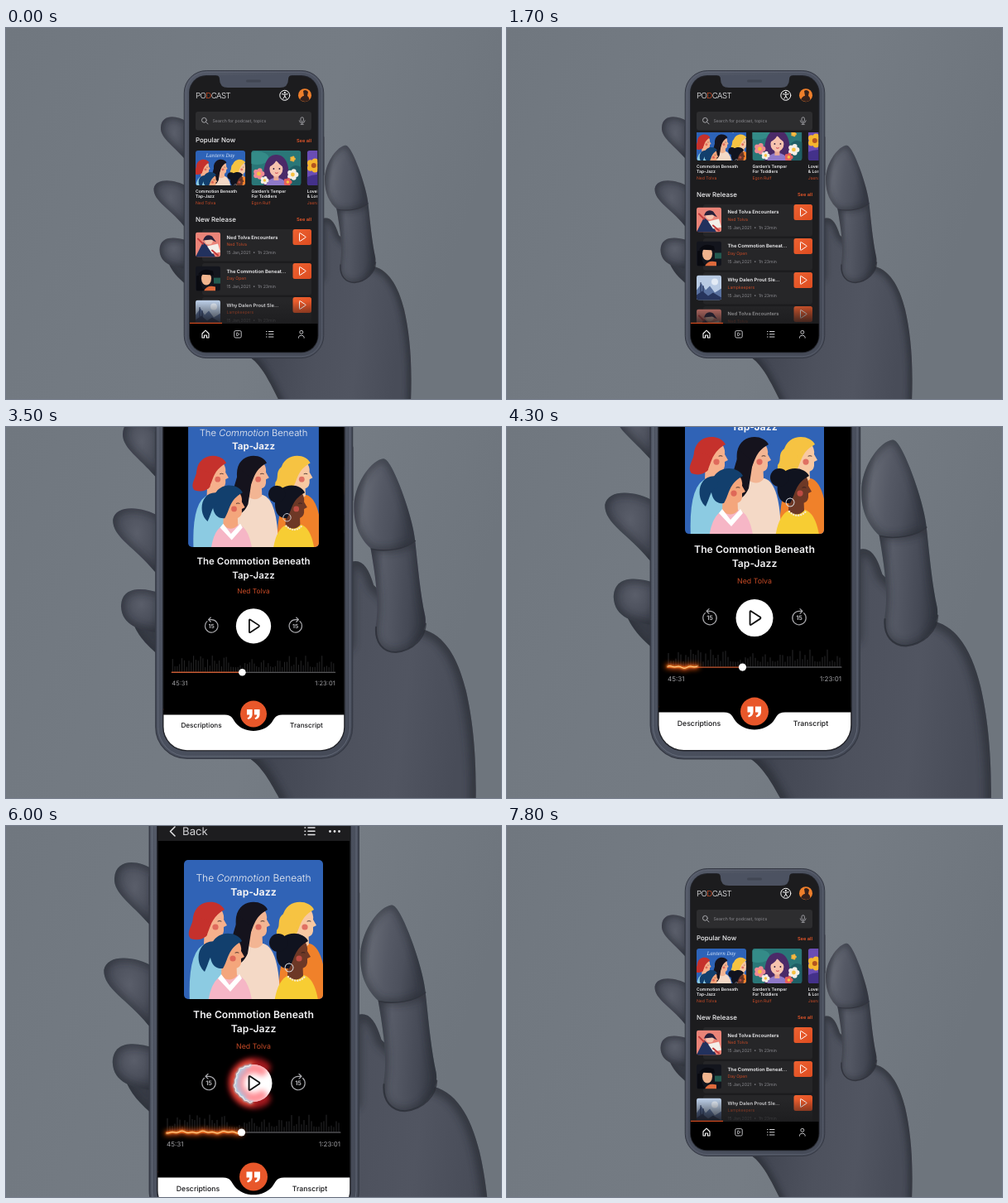
Recreate the animation shown at these times as an HTML page. Size 598 by 448 pixels, loop 8 s.

```html
<!DOCTYPE html>
<html lang="en">
<head>
<meta charset="utf-8">
<title>Podcast app</title>
<style>
html, body { margin: 0; width: 100%; height: 100%; overflow: hidden; background: #727982; }
svg { display: block; width: 598px; height: 448px; }
text { font-family: Inter, "Open Sans", sans-serif; text-rendering: geometricPrecision; fill: #f2f2f4; }
</style>
</head>
<body>
<svg id="stage" viewBox="0 0 598 448"></svg>
<script>
const LOOP = 8000, ORANGE = '#e8572a', RUST = '#c64a26';

const text = (x, y, s, size, o = '') => `<text x="${x}" y="${y}" font-size="${size}" ${o}>${s}</text>`;
const rect = (x, y, w, h, fill, r = 0, o = '') =>
  `<rect x="${x}" y="${y}" width="${w}" height="${h}" rx="${r}" fill="${fill}" ${o}/>`;
const dot = (x, y, r, fill, o = '') => `<circle cx="${x}" cy="${y}" r="${r}" fill="${fill}" ${o}/>`;
const oval = (x, y, rx, ry, fill) => `<ellipse cx="${x}" cy="${y}" rx="${rx}" ry="${ry}" fill="${fill}"/>`;
const path = (d, fill, o = '') => `<path d="${d}" fill="${fill}" ${o}/>`;
const line = (d, stroke, w = 1, o = '') =>
  `<path d="${d}" fill="none" stroke="${stroke}" stroke-width="${w}" stroke-linecap="round" stroke-linejoin="round" ${o}/>`;
const move = (x, y, inner, s = 1) => `<g transform="translate(${x} ${y}) scale(${s})">${inner}</g>`;
const clip = (id, inner) => `<g clip-path="url(#${id})">${inner}</g>`;
const clipBox = (id, x, y, w, h, r = 0) => `<clipPath id="${id}">${rect(x, y, w, h, '#fff', r)}</clipPath>`;
const stops = list => list.map((c, i) => `<stop offset="${i / (list.length - 1)}" stop-color="${c}"/>`).join('');
const radial = (id, cx, cy, r, ...c) => `<radialGradient id="${id}" cx="${cx}" cy="${cy}" r="${r}">${stops(c)}</radialGradient>`;
const linear = (id, x2, y2, ...c) => `<linearGradient id="${id}" x1="0" y1="0" x2="${x2}" y2="${y2}">${stops(c)}</linearGradient>`;
const blur = (id, d) => `<filter id="${id}" x="-60" y="-60" width="720" height="560" filterUnits="userSpaceOnUse"><feGaussianBlur stdDeviation="${d}"/></filter>`;

const defs = `<defs>
  ${linear('wall', 1, .25, '#70777f', '#737a82', '#757c84', '#6e757d')}
  ${radial('finger', .5, .35, .75, '#5a5e6a', '#4b4f5b', '#343842')}
  ${linear('thumb', 1, .2, '#3f434e', '#636772', '#555965', '#4c505c', '#3a3e49')}
  ${linear('joint', 1, .1, '#3f434e', '#585c68', '#4f535f', '#454955', '#343842')}
  ${linear('palm', 1, .15, '#343843', '#444854', '#4d515d', '#515561', '#484c58')}
  ${linear('body', 1, 1, '#535967', '#4a505e', '#454a57')}
  ${linear('play', 1, 1, '#ee6231', '#dd4c20')}
  <linearGradient id="fade" x1="0" y1="0" x2="0" y2="1"><stop offset="0" stop-color="#1c1c1e" stop-opacity="0"/><stop offset="1" stop-color="#1c1c1e" stop-opacity=".85"/></linearGradient>
  ${blur('soft', 3)}${blur('haze', 1.2)}
  ${clipBox('screen', 222, 58, 154.5, 333.3, 20)}
  ${clipBox('feed', 222, 126, 154.5, 231)}
  ${clipBox('cover', 0, 0, 60, 42, 3)}
  ${clipBox('thumbBox', 0, 0, 30, 30, 3)}
  ${clipBox('art', 215, 41, 168, 168, 5)}
  <clipPath id="disc"><circle r="22.5"/></clipPath>
</defs>`;

// A solid part of the hand with darkened rims.
let parts = 0;
function limb(d, fill, rim = 5) {
  const id = 'limb' + parts++;
  return `<clipPath id="${id}"><path d="${d}"/></clipPath>` + path(d, fill) +
    clip(id, line(d, '#272a33', rim, 'opacity=".6" filter="url(#soft)"'));
}
const hand = [
  limb('M218 113C206 105 188 104 187 120C186 132 201 141 214 156L220 162V113Z', 'url(#finger)'),
  limb('M218 191C205 183 181 180 178.5 194C178 209 198 218 214 238L220 244V192Z', 'url(#finger)'),
  limb('M195 280C199 293 208 302 220 312V276Z', '#383c46'),
  limb('M220 257C205 252 186 250 185.5 268C186 285 202 289 220 291Z', 'url(#finger)'),
  limb('M380 231C391 226 397 233 402 250L440 287C462 290 474 312 481 340C488 370 492 410 488 470L340 470L319.7 430C313 418 305 403 292 396L380 300Z', 'url(#palm)', 11),
  limb('M399 216C412 222 430 219 437.5 212C440 235 442 258 446 276C449 291 436 307 420 307.5C407 307 402 297 404 283C407 263 403 240 399 216Z', 'url(#joint)'),
  line('M404 286C403 299 410 307.5 421 307.5C436 306 446 295 446.5 283', '#292c34', 1.4, 'opacity=".7"'),
  limb('M408.5 142C398 145 385 165 385 183C385 200 391 211 400 219C412 222 430 219 437.5 212C436 195 424 160 416 147C413 142 411 141 408.5 142Z', 'url(#thumb)'),
  line('M400 219C412 222 430 219 437.5 212', '#30333c', 1),
].join('');

const phone = rect(214.4, 118, 3, 24, '#3b3f4a', 1) + rect(381.5, 131, 3, 47, '#3b3f4a', 1) +
  rect(215.2, 51.5, 168.6, 347, 'url(#body)', 27, 'stroke="#363a45"') +
  rect(217.3, 53.3, 164.4, 343.4, 'none', 25, 'stroke="#656b7a" stroke-width=".6"') +
  rect(221, 57, 156.5, 335.3, '#23252c', 21);
const notch = path('M253 57q5 0 5 5q0 10 10 10h63q10 0 10-10q0-5 5-5z', '#4c5261') + rect(290, 62.5, 18, 3, '#414653', 1.5);

// One person in profile, facing right.
function lady(x, y, skin, hair, top, extra = '') {
  return move(x, y,
    path('M-27 100Q-30 36-8 28H10Q30 34 30 100Z', top) +
    path('M-9 5H8L9 29Q0 38-10 29Z', skin) +
    path('M-8-14H10Q15-8 14-1L18 6L14 8V13Q13 20 6 20H-2Q-9 14-9 0Z', skin) +
    path('M15-13C9-26-19-27-23-4C-25 12-19 21-8 20C-1 9-3-3 15-13Z', hair) +
    dot(4, 8, 3.6, '#d9534d', 'opacity=".75"') + line('M7 1q2-1 4 0', '#2a1a1a', .8) + extra);
}
const crowd =
  lady(249, 114, '#f6b08c', '#c5312c', '#8ccbe2', path('M-22-6C-24 8-32 14-26 22Q-14 26-6 18L-4 0Z', '#c5312c')) +
  lady(357, 114, '#f8c8a2', '#f6c342', '#f0812a', path('M-18-10C-32-4-24 6-30 12C-32 26-18 26-8 24L-5 0Z', '#f6c342')) +
  lady(301, 114, '#f3b593', '#15131d', '#f4d9c6', path('M-20-6C-26 16-34 34-30 54Q-16 56-9 40L-4 8Z', '#15131d')) +
  lady(270, 152, '#f4a67c', '#123f6d', '#f6b6c6', path('M-14-12C-38-18-44 12-30 24C-24 12-24 2-16 2Z', '#123f6d') + path('M-10 27L0 40L12 27L15 32L1 48L-14 32Z', '#fff')) +
  lady(350, 152, '#6d3826', '#10131f', '#f7cd33', dot(-21, -11, 11, '#10131f') + line('M-9 30Q2 40 12 29', '#f6e7c8', 2.4, 'stroke-dasharray=".1 3"') + line('M-8 14a5 5 0 1 0 .1 0', '#d9d9de', 1));

const flower = (x, y, r, c, mid = '#f6c342') =>
  [0, 1, 2, 3, 4].map(i => dot(x + r * Math.cos(i * 1.257), y + r * Math.sin(i * 1.257), r * .75, c)).join('') + dot(x, y, r * .6, mid);

const covers = [
  rect(0, 0, 60, 42, '#2d63b8') + move(-90.5, -26.5, crowd, .405) +
    text(30, 7.5, 'Lantern Day', 6, 'text-anchor="middle" font-style="italic" style="font-family:\'Noto Serif\',serif;fill:#cfe0f7"'),
  rect(0, 0, 60, 42, '#2a7778') + oval(7, 9, 14, 8, '#348b88') + oval(54, 34, 12, 16, '#1f5f66') +
    path('M15 42C13 22 17 5 30 5S47 20 45 42Z', '#4b2a68') + path('M18 42Q20 33 30 33T43 42Z', '#8f79c9') +
    rect(27, 28, 6, 8, '#e9a894') + oval(30, 22, 8, 9.5, '#f6c3ae') + path('M21 20C23 8 37 8 39 20C34 17 32 14 30 12C28 16 25 18 21 20Z', '#4b2a68') +
    dot(27, 22, .9, '#2a1a3a') + dot(34, 22, .9, '#2a1a3a') + line('M29 27q1.5 1 3 0', '#cc3f4c', 1) +
    flower(9, 28, 4, '#f08a94') + flower(50, 29, 4, '#f3eee6') + flower(16, 36, 3, '#f3eee6') + flower(44, 38, 3, '#e85f5c') + flower(50, 10, 2, '#f3b13e'),
  rect(0, 0, 60, 42, '#6a4db4') + flower(8, 18, 5, '#f5b62f', '#b3541e') + oval(12, 38, 16, 9, '#43318a') +
    flower(32, 28, 5, '#f08a94') + flower(48, 14, 4, '#f5b62f', '#b3541e') + oval(50, 40, 12, 7, '#2c8f7e'),
];
const shelf = [
  ['Commotion Beneath', 'Tap-Jazz', 'Ned Tolva'],
  ['Garden’s Temper', 'For Toddlers', 'Egon Rulf'],
  ['Lovely Days', '&amp; Long Nights', 'Jasna Orlo'],
].map(([a, b, who], i) => move(229 + 67.4 * i, 148,
  clip('cover', covers[i]) + text(0, 51, a, 5.1, 'font-weight="600"') + text(0, 57.2, b, 5.1, 'font-weight="600"') +
  text(0, 65.3, who, 5.1, `style="fill:${RUST}"`))).join('');

const thumbs = [
  rect(0, 0, 30, 30, '#ea8478') + path('M0 30L9 12L18 20L24 30Z', '#22315d') + dot(16, 10, 5, '#f6c3ae') +
    path('M9 10Q12 1 20 5L25 12L19 9Z', '#27203a') + path('M14 17L27 14L30 24L20 26Z', '#f4efe9') + line('M3 8L9 14M20 22L27 28', '#c23a3a', 2),
  rect(0, 0, 30, 30, '#13151d') + oval(13, 15, 6, 8, '#f0b48e') + path('M3 10Q9 1 21 6L22 11Z', '#090a10') + path('M7 10Q4 25 12 30H1V12Z', '#090a10') +
    path('M10 30Q14 22 24 25V30Z', '#df6a3c') + rect(22, 14, 8, 7, '#235a50'),
  rect(0, 0, 30, 30, '#b9cbe4') + dot(22, 8, 4, '#e3ebf5') + path('M0 30V18L6 10L11 18L16 13L22 21L30 16V30Z', '#59719f') +
    path('M0 30V24L7 19L14 25L20 21L30 27V30Z', '#26345c') + line('M5 20V9M8 22V13', '#26345c', 1.2),
];
const triangle = 'M-3.2-4.4Q-3.2-5.2-2.4-4.8L4-.6Q4.7 0 4 .6L-2.4 4.8Q-3.2 5.2-3.2 4.4Z';
const episodes = [
  ['Ned Tolva Encounters', 'Ned Tolva'],
  ['The Commotion Beneat...', 'Day Open'],
  ['Why Dalen Prout Sle...', 'Lampkeepers'],
];
const rows = [0, 1, 2, 3, 4, 5].map(i => {
  const [name, who] = episodes[i % 3];
  return move(229, 243 + 41 * i,
    rect(8, 0, 132, 38.5, '#262628', 3) + move(0, 3.6, clip('thumbBox', thumbs[i % 3])) +
    text(37.5, 11.6, name, 5.85, 'font-weight="600"') + text(37.5, 19.7, who, 5.1, `style="fill:${RUST}"`) +
    text(37.5, 29.8, '15 Jan,2021 &#160;•&#160; 1h 23min', 5.2, 'style="fill:#8b8b90"') +
    rect(117.5, 0, 22.5, 19, 'url(#play)', 2.5) + move(128.7, 9.5, line(triangle, '#fff', 1)));
}).join('');

const heading = (y, s) => text(229, y, s, 7.9, 'font-weight="500"') +
  text(369, y - .5, 'See all', 5.7, `font-weight="600" text-anchor="end" style="fill:${ORANGE}"`);
const home = rect(222, 58, 155, 334, '#1c1c1e') +
  clip('feed', `<g id="scroll">${heading(138.3, 'Popular Now')}<g id="shelf">${shelf}</g>${heading(233.8, 'New Release')}${rows}</g>`) +
  rect(222, 330, 155, 27, 'url(#fade)') +
  text(229, 84.8, `PO<tspan fill="${ORANGE}">D</tspan>CAST`, 9.7, 'font-weight="300" letter-spacing="-.55"') +
  line('M342.8 81.3a6 6 0 1 0-12 0a6 6 0 1 0 12 0M333.4 79.8q3.4 1.2 6.8 0M336.8 80.6v2M334.8 85.2l2-2.8l2 2.8', '#fff', 1) + dot(336.8, 78, 1.1, '#fff') +
  dot(361, 81.2, 8, '#ef7f2b') + path('M355 86.5Q357 82 360 82L359 76Q362 73.5 365 77L364 82Q366 83 366.5 87Q361 91 355 86.5Z', '#35211c') +
  rect(229, 101, 140, 22.4, '#2d2d2f', 3) + line('M242.3 111.3a2.9 2.9 0 1 0-5.8 0a2.9 2.9 0 1 0 5.8 0M241.6 113.5l2.4 2.4', '#b4b4b8', .9) +
  text(249.5, 114, 'Search for podcast, topics', 5.2, 'style="fill:#8d8d92"') +
  rect(356, 107.8, 3.4, 5.4, 'none', 1.7, 'stroke="#a8a8ad" stroke-width=".9"') + line('M354.2 111.8q.4 3 3.5 3t3.5-3M357.7 115v1.4M356 116.4h3.4', '#a8a8ad', .8) +
  rect(222, 357, 155, 35, '#000') + rect(222, 355.8, 39, 1.2, '#d14a1e') +
  line('M237 369l4-3.8l4 3.8v5h-2.6v-3h-2.8v3H237z', '#fff', 1.1) +
  rect(275.8, 365.6, 8.4, 8.4, 'none', 1.5, 'stroke="#d5d5d8" stroke-width=".9"') + move(280, 369.8, line(triangle, '#d5d5d8', 2), .42) +
  line('M314.5 366.5h.6M314.5 369.8h.6M314.5 373h.6M317.4 366.5h5.6M317.4 369.8h5.6M317.4 373h5.6', '#d5d5d8', 1) +
  dot(356.8, 367.3, 2, 'none', 'stroke="#d5d5d8" stroke-width=".9"') + line('M353.5 374.2v-1q.5-2 3.3-2t3.3 2v1', '#d5d5d8', .9) +
  dot(262, 170, 14, '#fff', 'id="tap"');

// The player is laid out at the close-up scale.
const noise = i => { const v = Math.sin(i * 91.7) * 4375.5; return v - Math.floor(v); };
const ticks = Array.from({ length: 70 }, (_, i) => `M${195 + i * 3}  369v${-(5 + 15 * noise(i + 1) ** 1.5).toFixed(1)}`).join('');
const skip = (x, dir) => move(x, 310.5,
  `<g transform="scale(${dir} 1)">${line('M-5.6-6a8.2 8.2 0 1 0 5.6-2.2h-3M-1-11l-3 2.8l3 2.8', '#a9a9ad', 1.2)}</g>` +
  text(0, 2.8, '15', 7.5, 'font-weight="600" text-anchor="middle" style="fill:#c4c4c8"'));
const arc = (deg, r) => {
  const a = deg * Math.PI / 180, x = r * Math.cos(a), y = r * Math.sin(a);
  return `M${x} ${-y}A${r} ${r} 0 ${deg > 90 ? 1 : 0} 1 ${x} ${y}`;
};
const mid = 'text-anchor="middle"';
const player = rect(180, -32, 238, 505, '#000') + rect(180, -32, 238, 50, '#1d1d1f') +
  line('M204 1l-5.5 5.5L204 12', '#e4e4e6', 1.5) + text(213, 11.4, 'Back', 13.2, 'style="fill:#d2d2d5"') +
  line('M361 2h.6M361 6.3h.6M361 10.6h.6M365 2h8M365 6.3h8M365 10.6h8', '#e4e4e6', 1.5) +
  [391.5, 397, 402.5].map(x => dot(x, 6.5, 1.4, '#e4e4e6')).join('') +
  clip('art', rect(215, 41, 168, 168, '#3063b6') + crowd) +
  text(299, 66.6, 'The <tspan font-style="italic">Commotion</tspan> Beneath', 12, mid + ' font-weight="300"') +
  text(299, 84, 'Tap-Jazz', 12.2, mid + ' font-weight="700"') +
  text(299, 231.6, 'The Commotion Beneath', 12.2, mid + ' font-weight="600"') +
  text(299, 249, 'Tap-Jazz', 12.2, mid + ' font-weight="600"') +
  text(299, 268.7, 'Ned Tolva', 8.8, mid + ` style="fill:${RUST}"`) +
  skip(245, 1) + skip(353, -1) +
  move(299, 310.5,
    `<g id="halo">${line(arc(125, 23), '#e8222a', 15, 'opacity=".7" filter="url(#soft)"')}${line(arc(85, 24), '#ff6a4a', 5, 'filter="url(#soft)"')}</g>` +
    dot(0, 0, 22.5, '#fff') +
    clip('disc', `<g id="tint">${line(arc(125, 18), '#ff8f96', 12, 'filter="url(#soft)"')}${line(arc(60, 20), '#8fd0f5', 4, 'filter="url(#soft)"')}</g>`) +
    `<g id="sparks">${line('', '#8fe2ff', 2.2, 'filter="url(#haze)" id="arcGlow"')}${line('', '#ffe9e2', 1, 'id="arcCore"')}</g>` +
    move(0, 0, line(triangle, '#111', 1.1), 1.7)) +
  line(ticks, '#333335', .8) + line('M284 370H404', '#77777a', 1) + line('M194 370H284', '#c65a33', 1.4) +
  `<g id="fire">${line('', '#ff5a12', 5, 'filter="url(#soft)" class="flame"')}${line('', '#ff8a2c', 2.4, 'filter="url(#haze)" class="flame"')}${line('', '#ffe0a0', .9, 'class="flame"')}</g>` +
  dot(284.5, 370, 4.6, '#fff') +
  text(194, 386.5, '45:31', 8, 'style="fill:#a0a0a4"') + text(404, 386.5, '1:23:01', 8, 'text-anchor="end" style="fill:#a0a0a4"') +
  path('M180 424.5H262C272 424.5 272 430 276 435C287 448.8 311 448.8 322 435C326 430 326 424.5 336 424.5H418V474H180Z', '#fff') +
  dot(299, 423.5, 17, ORANGE) +
  [290.5, 300].map(x => path(`M${x} 417.5h7v6.5q0 5-5.5 6.5l-1-2q3-1 3-4h-3.5z`, '#fff')).join('') +
  text(232, 441, 'Descriptions', 8.7, mid + ' font-weight="500" style="fill:#151517"') +
  text(367, 441, 'Transcript', 8.7, mid + ' font-weight="500" style="fill:#151517"');

const stage = document.getElementById('stage');
stage.innerHTML = defs + rect(0, 0, 598, 448, 'url(#wall)') +
  `<g id="camera">${hand}${phone}${clip('screen', home + `<g id="player" transform="translate(99.667 78) scale(.66667)">${player}</g>`)}${notch}</g>`;

const $ = id => document.getElementById(id);
const set = (id, k, v) => $(id).setAttribute(k, v);
const flames = document.querySelectorAll('.flame');
const prog = (t, a, b) => Math.min(1, Math.max(0, (t - a) / (b - a)));
const inOut = p => p < .5 ? 4 * p ** 3 : 1 - 4 * (1 - p) ** 3;
const out = p => 1 - (1 - p) ** 2;

function render(t) {
  const zoom = inOut(prog(t, 2960, 3800)) - inOut(prog(t, 6000, 6700));
  const pan = inOut(prog(t, 4200, 5750));
  const s = 1 + .5 * zoom;
  set('camera', 'transform', `translate(${299 * (1 - s)} ${zoom * (80 * pan - 197)}) scale(${s})`);

  const swipe = inOut(prog(t, 340, 720)) - inOut(prog(t, 940, 1540));
  set('shelf', 'transform', `translate(${-56 * swipe} 0)`);
  const scroll = out(prog(t, 1600, 2250)) - inOut(prog(t, 2250, 2850));
  set('scroll', 'transform', `translate(0 ${-105 * scroll})`);
  const tap = prog(t, 2950, 3250);
  set('tap', 'r', 12.5 + 8 * tap);
  set('tap', 'opacity', t < 2950 ? 0 : .85 * (1 - tap));

  const shown = prog(t, 3120, 3400) - prog(t, 7450, 7700);
  set('player', 'opacity', shown);
  set('player', 'display', shown ? 'inline' : 'none');
  if (!shown) return;

  const burn = prog(t, 4100, 4600);
  let d = '';
  for (let x = 194; x <= 194 + 90 * burn; x += 2) {
    const y = 369.7 + 1.6 * Math.sin(x * .37 + t * .017) * Math.sin(x * .14 - t * .011);
    d += `${d ? 'L' : 'M'}${x} ${y.toFixed(2)}`;
  }
  flames.forEach(f => f.setAttribute('d', d));
  set('fire', 'opacity', burn && 1);

  const glow = prog(t, 4500, 4800) - prog(t, 6400, 6700);
  const turn = 70 + (t - 5200) * .1375;
  for (const id of ['halo', 'tint', 'sparks']) {
    set(id, 'opacity', glow);
    set(id, 'transform', `rotate(${turn})`);
  }
  let spark = '';
  for (let a = -1.5; a <= 1.5; a += .1) {
    const r = 22.5 + 1.6 * Math.sin(a * 13 + t * .02) * Math.cos(a * 7 - t * .013);
    spark += `${spark ? 'L' : 'M'}${(r * Math.cos(a)).toFixed(2)} ${(r * Math.sin(a)).toFixed(2)}`;
  }
  set('arcGlow', 'd', spark);
  set('arcCore', 'd', spark);
}

const start = performance.now();
function tick() {
  render((performance.now() - start) % LOOP);
  requestAnimationFrame(tick);
}
tick();
</script>
</body>
</html>
```
